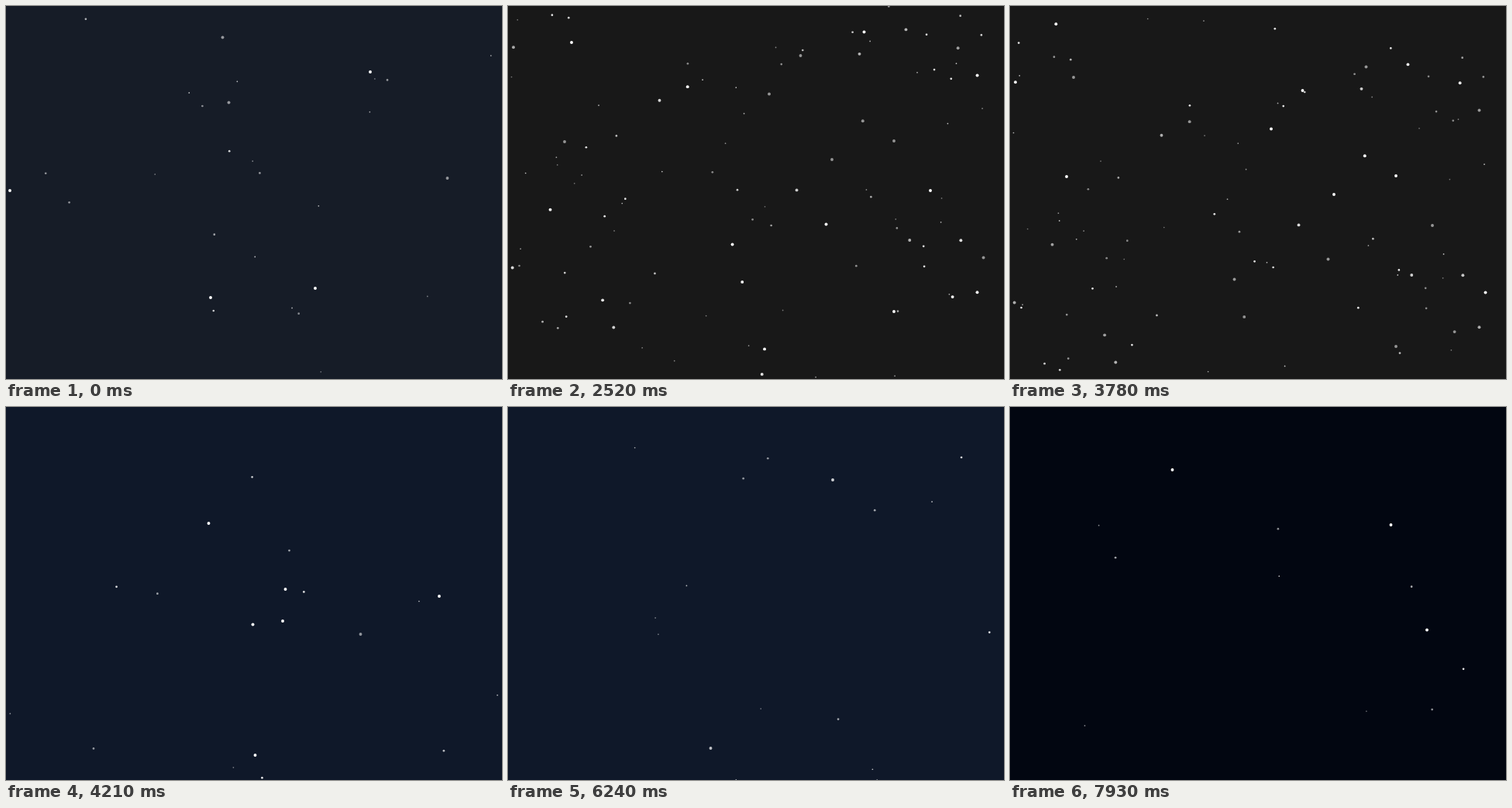
Write an HTML page with a canvas that moves like this. It is 640 px wide and 481 px high and loops after 8 s.

```html
<!DOCTYPE html>
<html lang="en">
<head>
<meta charset="utf-8">
<title>Drifting stars</title>
<style>
  html, body { margin: 0; width: 100%; height: 100%; overflow: hidden; background: #161c27; }
  canvas { display: block; width: 640px; height: 481px; }
</style>
</head>
<body>
<canvas id="sky" width="640" height="481"></canvas>
<script>
const WIDTH = 640, HEIGHT = 481, LOOP = 8000, LAST_STEP = 114;
const TWINKLE_STEPS = 40;

// Speeds are pixels per step.
const layers = {
  big: { radius: 1.95, light: 1, slow: 2.5, fast: 10 },
  mid: { radius: 1.35, light: .9, slow: 3, fast: 15 },
  small: { radius: .85, light: .75, slow: 4, fast: 20 }
};

// `bright` and `dim` place the leading big stars at step `ref`;
// `scatter` is how many further stars of a layer are in view at once.
const scenes = [
  { from: 0, ref: 0, sky: '#161c27', pace: 'slow', seed: 11,
    bright: [[470, 85], [5, 238], [264, 376], [399, 364]],
    dim: [[279.5, 40.5], [287.5, 124.5], [569.5, 222]],
    scatter: { mid: 9, small: 12 } },
  { from: 28, ref: 36, sky: '#181818', pace: 'slow', seed: 23,
    bright: [[82, 47], [459.5, 33.5], [605.5, 89.5], [545, 238], [410.5, 281.5], [498, 394]],
    dim: [[73, 175], [377.5, 64], [337, 113.5], [418, 198], [498, 174], [613.5, 324.5]],
    scatter: { big: 19, mid: 33, small: 31 } },
  { from: 60, ref: 60, sky: '#0f1829', pace: 'fast', seed: 37,
    bright: [[261.5, 150], [360.5, 235], [318.5, 280.5], [357, 276], [559, 244], [321.5, 449]],
    dim: [[457.5, 293], [419, -196]],
    scatter: { mid: 7, small: 6 } },
  { from: 93, ref: 113, sky: '#020611', pace: 'fast', seed: 41,
    bright: [[209.5, 81], [491.5, 152], [538, 287.5]],
    dim: [],
    scatter: { mid: 5, small: 4 } }
];

function seededRandom(seed) {
  return () => {
    seed = (seed + 0x6D2B79F5) | 0;
    let n = Math.imul(seed ^ (seed >>> 15), 1 | seed);
    n = (n + Math.imul(n ^ (n >>> 7), 61 | n)) ^ n;
    return ((n ^ (n >>> 14)) >>> 0) / 4294967296;
  };
}

// Spread stars over everything that drifts through view during the scene.
function scatterLayer(name, count, scene, end, random) {
  const speed = layers[name][scene.pace];
  const top = -speed * (end - scene.ref);
  const height = HEIGHT + speed * (end - scene.from);
  return Array.from({ length: Math.round(count * height / HEIGHT) }, () => ({
    layer: layers[name],
    x: random() * WIDTH,
    y: top + random() * height,
    phase: random()
  }));
}

function makeStars(scene, index) {
  const end = scenes[index + 1]?.from ?? LAST_STEP;
  const random = seededRandom(scene.seed);
  const lead = phase => ([x, y]) => ({ layer: layers.big, x, y, phase });
  return [
    ...scene.bright.map(lead(0)),
    ...scene.dim.map(lead(.5)),
    ...Object.entries(scene.scatter).flatMap(
      ([name, count]) => scatterLayer(name, count, scene, end, random))
  ];
}

scenes.forEach((scene, index) => { scene.stars = makeStars(scene, index); });

const ctx = document.getElementById('sky').getContext('2d');

// Steps last 70 ms; two of them are held 10 ms longer.
function stepAt(ms) {
  const held = (ms >= 4210 ? 10 : 0) + (ms >= 6740 ? 10 : 0);
  return Math.floor((ms - held) / 70);
}

function drawStar({ layer, x, y, phase }, pace, elapsed) {
  const wave = Math.cos(2 * Math.PI * (elapsed / TWINKLE_STEPS + phase));
  ctx.globalAlpha = layer.light * (.77 + .23 * wave);
  ctx.beginPath();
  ctx.arc(x, y + elapsed * layer[pace], layer.radius, 0, 2 * Math.PI);
  ctx.fill();
}

function draw(step) {
  const scene = scenes.findLast(s => step >= s.from);
  ctx.globalAlpha = 1;
  ctx.fillStyle = scene.sky;
  ctx.fillRect(0, 0, WIDTH, HEIGHT);
  ctx.fillStyle = '#fff';
  scene.stars.forEach(star => drawStar(star, scene.pace, step - scene.ref));
}

const start = performance.now();
function tick() {
  draw(stepAt((performance.now() - start) % LOOP));
  requestAnimationFrame(tick);
}
tick();
</script>
</body>
</html>
```
